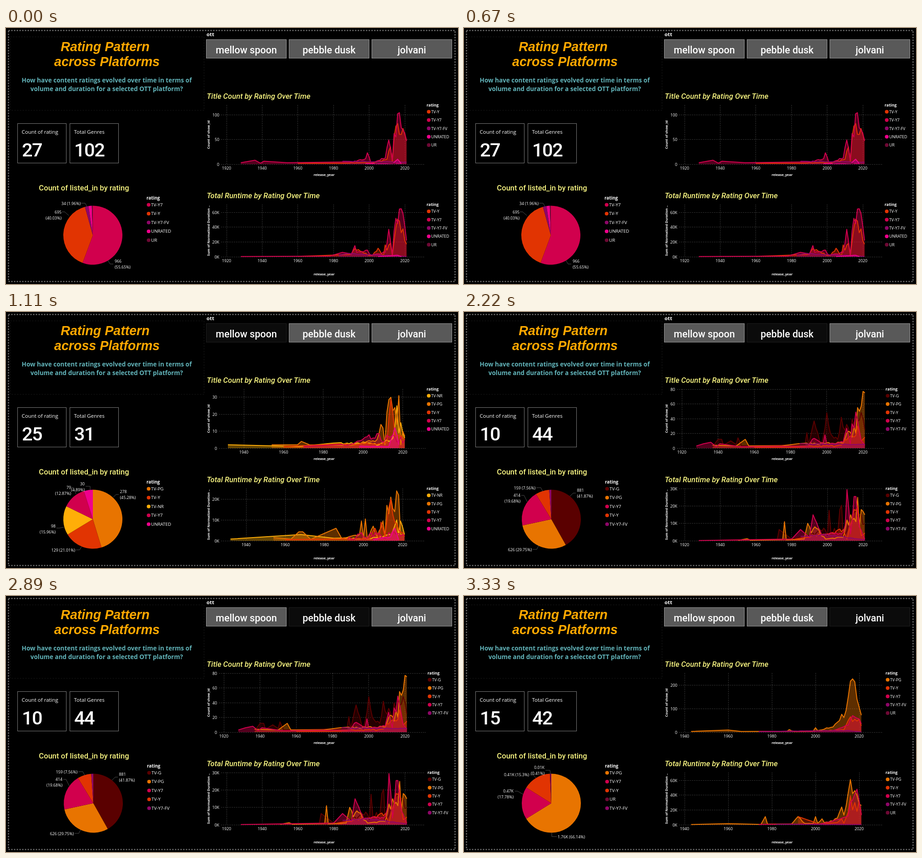
These frames come from a looping animation (994x564 px, 4.44 s). An HTML page:

```html
<!DOCTYPE html>
<html lang="en">
<head>
<meta charset="utf-8">
<title>Rating dashboard</title>
<style>
html, body { margin: 0; width: 100%; height: 100%; overflow: hidden; background: #000; }
svg { display: block; width: 994px; height: 564px; }
text { fill: #fff; font-family: "Open Sans", "Noto Sans", sans-serif; font-size: 8.8px; font-weight: 500; }
.head { font: italic bold 28.6px "Liberation Sans", Arial, sans-serif; fill: #ffa800; }
.ask { font-size: 13.5px; font-weight: 700; fill: #62b4ba; }
.ott { font-size: 11.3px; font-weight: 700; }
.btn { font: 500 21.5px Roboto, sans-serif; }
.name { font: 500 16.6px Roboto, sans-serif; fill: #f8f582; }
.tilt { font-style: italic; }
.card { font-size: 11.5px; }
.big { font: 500 41.5px Roboto, sans-serif; letter-spacing: -1.5px; }
.key { font-size: 9.8px; }
.bold { font-weight: 700; }
.axis { font-size: 7.4px; font-weight: 700; }
.mid { text-anchor: middle; }
.end { text-anchor: end; }
</style>
</head>
<body>
<svg id="stage" viewBox="0 0 994 564"></svg>
<script>
const STAY = 1110;
const RATINGS = {
  NR: ['TV-NR', '#ffae08'], PG: ['TV-PG', '#e87400'], Y: ['TV-Y', '#e13402'],
  Y7: ['TV-Y7', '#d1004d'], FV: ['TV-Y7-FV', '#8e0668'], UN: ['UNRATED', '#f0008c'],
  UR: ['UR', '#6e0834'], G: ['TV-G', '#5a0000']
};
const PLATFORMS = ['mellow spoon', 'pebble dusk', 'jolvani'];
const stage = document.getElementById('stage');

let seed = 7;
function random() {
  seed = (seed * 16807) % 2147483647;
  return seed / 2147483647;
}

function add(parent, tag, attrs) {
  const el = document.createElementNS('http://www.w3.org/2000/svg', tag);
  for (const k in attrs) el.setAttribute(k, attrs[k]);
  return parent.appendChild(el);
}
function text(parent, x, y, str, cls = '', more = {}) {
  add(parent, 'text', { x, y, class: cls, ...more }).textContent = str;
}
function box(parent, x, y, width, height, fill, stroke, more = {}) {
  add(parent, 'rect', { x, y, width, height, fill, stroke, ...more });
}
function legend(g, x, y, step, keys, cls) {
  text(g, x, y + 3.5, 'rating', cls + ' bold');
  keys.forEach((k, i) => {
    const [label, fill] = RATINGS[k];
    const cy = y + 15.5 + i * step;
    add(g, 'circle', { cx: x + 4.7, cy, r: 4.1, fill });
    text(g, x + 10, cy + 3.4, label, cls);
  });
}

// Joins key points (year, value); recent years between them wobble around the straight line.
function trace(keys, rough) {
  const pts = [];
  for (let i = 0; i < keys.length; i += 2) {
    const [year, value, nextYear, nextValue] = keys.slice(i, i + 4);
    pts.push([year, value]);
    for (let y = Math.max(year, 88) + 1; y < nextYear; y++) {
      const v = value + (nextValue - value) * (y - year) / (nextYear - year);
      pts.push([y, v * (1 + rough * (2 * random() - 1))]);
    }
  }
  return pts;
}

// Draws axes and legend; returns a function that adds one series. Years count from 1900.
function chart(g, o) {
  const { base, top, x0, year0, step, unit, gap, count, left, suffix, keys, legendX } = o;
  const px = year => x0 + (year - year0) * step;
  const py = v => base - v * unit;
  const crisp = n => Math.floor(n) + 0.5;
  const dots = { stroke: '#808080', 'stroke-dasharray': '1 3' };
  for (let yr = year0; yr <= 120; yr += 20) {
    const x = crisp(px(yr));
    add(g, 'line', { x1: x, x2: x, y1: top, y2: base, ...dots });
    text(g, px(yr), base + 12, 1900 + yr, 'mid');
  }
  for (let i = 0; i <= count; i++) {
    const y = crisp(py(i * gap));
    add(g, 'line', { x1: left + 5, x2: 922, y1: y, y2: y, ...dots });
    text(g, left, y + 3, i * gap + suffix, 'end');
  }
  legend(g, legendX, top - 1, 18.35, keys, '');
  const fills = add(g, 'g', { 'fill-opacity': 0.4 });
  const lines = add(g, 'g', { fill: 'none', 'stroke-width': 2, 'stroke-linejoin': 'round' });
  return (key, points, rough = 0.2) => {
    const color = RATINGS[key][1];
    const pts = trace(points, rough);
    const d = 'M' + pts.map(([yr, v]) => px(yr).toFixed(1) + ' ' + py(v).toFixed(1)).join('L');
    add(fills, 'path', { d: `${d}V${base}H${px(pts[0][0])}Z`, fill: color });
    add(lines, 'path', { d, stroke: color });
  };
}
const countChart = (g, o) => chart(g, { base: 300, top: 170, left: 469, suffix: '', ...o });
const timeChart = (g, o) => chart(g, { base: 504, top: 389.5, left: 469, suffix: 'K', ...o });

function pie(g, cx, parts) {
  const cy = 456.5, r = 65;
  let sum = 0;
  const point = p => {
    const a = p / 100 * 2 * Math.PI;
    return `${cx + r * Math.sin(a)} ${cy - r * Math.cos(a)}`;
  };
  for (const [key, share] of parts) {
    const from = point(sum);
    sum += share;
    add(g, 'path', {
      d: `M${cx} ${cy}L${from}A${r} ${r} 0 ${share > 50 ? 1 : 0} 1 ${point(sum)}Z`,
      fill: RATINGS[key][1]
    });
  }
  legend(g, cx + 118, 374, 19.5, parts.map(p => p[0]), 'key');
}
function note(g, x, y, lines, cls, leader) {
  lines.forEach((s, i) => text(g, x, y + i * 12.6, s, cls));
  add(g, 'path', { d: leader, fill: 'none', stroke: '#4c4c4c' });
}
function controls(g, picked, ratings, genres) {
  PLATFORMS.forEach((name, i) => {
    const x = 440.5 + i * 182, on = i === picked;
    box(g, x, 25.5, 176, 41, on ? '#0b0b0b' : '#595959', on ? '#1e1e1e' : '#999');
    text(g, x + 88, 56, name, 'btn mid');
  });
  text(g, 35, 282.5, ratings, 'big');
  text(g, 150, 282.5, genres, 'big');
}

function backdrop() {
  box(stage, 5.5, 5.5, 982, 553, 'none', '#707070', { 'stroke-width': 2.5, 'stroke-dasharray': '3 3' });
  box(stage, 9.5, 19.5, 426, 162, 'none', '#0e0e0e', { 'stroke-width': 2, 'stroke-dasharray': '3 3' });
  text(stage, 218, 51, 'Rating Pattern', 'head mid');
  text(stage, 222, 84, 'across Platforms', 'head mid');
  text(stage, 221.5, 120, 'How have content ratings evolved over time in terms of', 'ask mid');
  text(stage, 221.5, 138.5, 'volume and duration for a selected OTT platform?', 'ask mid');
  text(stage, 441, 18, 'ott', 'ott');
  ['Count of rating', 'Total Genres'].forEach((label, i) => {
    box(stage, 25.5 + i * 115, 210.5, 107, 87, '#000', '#7d7d7d');
    text(stage, 34.5 + i * 115, 233, label, 'card');
  });
  text(stage, 171.5, 358, 'Count of listed_in by rating', 'name mid');
  const labels = (y, title, axisY, axis) => {
    text(stage, 441.5, y, title, 'name tilt');
    text(stage, 0, 0, axis, 'axis mid', { transform: `translate(447.5 ${axisY}) rotate(-90)` });
    text(stage, 699.5, y + 169.5, 'release_year', 'axis mid');
  };
  labels(156, 'Title Count by Rating Over Time', 235, 'Count of show_id');
  labels(375, 'Total Runtime by Rating Over Time', 446.5, 'Sum of Normalized Duration ..');
}

function allPlatforms(g) {
  controls(g, -1, 27, 102);
  pie(g, 191, [['Y7', 55.65], ['Y', 40.03], ['FV', 1.96], ['UN', 1.8], ['UR', 0.56]]);
  note(g, 164, 390, ['34 (1.96%)'], 'end', 'M165 386h9l4 7');
  note(g, 122, 409, ['695', '(40.03%)'], 'end', 'M123 405h6l9 8');
  note(g, 239, 517, ['966', '(55.65%)'], '', 'M224 512l5 8h7');
  const axis = { x0: 485, year0: 20, step: 3.92, legendX: 925, keys: ['Y', 'Y7', 'FV', 'UN', 'UR'] };

  let area = countChart(g, { ...axis, unit: 1.09, gap: 50, count: 2 });
  area('Y', [60, 2, 103, 3, 110, 10, 112, 35, 113, 6, 114, 55, 116, 82, 118, 60, 119, 72, 121, 48]);
  area('Y7', [28, 3, 36, 8, 39, 2, 41, 6, 54, 3, 91, 4, 98, 11, 99, 23, 101, 3, 109, 12, 111, 49,
    113, 8, 114, 62, 115, 55, 116, 102, 117, 104, 121, 47]);
  area('FV', [85, 6, 121, 4]);
  area('UN', [98, 1, 113, 1, 116, 10, 118, 1]);
  area('UR', [103, 2, 115, 2]);

  area = timeChart(g, { ...axis, unit: 1.633, gap: 20, count: 3 });
  area('Y', [60, 0.5, 90, 4, 92, 11, 100, 2, 102, 2, 105, 11.5, 108, 1.5, 109, 16, 110, 9, 112, 18,
    113, 1.5, 115, 39, 117, 48, 121, 17]);
  area('Y7', [28, 0.3, 78, 1, 85, 6, 90, 3, 92, 15, 93, 6, 99, 9, 101, 2, 109, 6, 111, 37, 113, 3,
    114, 35, 117, 64.5, 118, 64.8, 121, 22]);
  area('FV', [83, 2.5, 90, 4, 121, 0.5]);
  area('UN', [105, 0.3, 116, 2, 118, 0.3]);
}

function firstPlatform(g) {
  controls(g, 0, 25, 31);
  pie(g, 191, [['PG', 45.28], ['Y', 21.01], ['NR', 15.96], ['Y7', 12.87], ['UN', 4.88]]);
  note(g, 250.5, 399, ['278', '(45.28%)'], '', 'M236 408l6 -6h6');
  note(g, 173, 382, ['30', '(4.89%)'], 'end', 'M175 384h10v8');
  note(g, 143, 390, ['79', '(12.87%)'], 'end', 'M144 387h5l5 14');
  note(g, 109, 475, ['98', '(15.96%)'], 'end', 'M111 476h7l9 -2');
  note(g, 152, 528, ['129 (21.01%)'], 'end', 'M154 524h8l4 -7');
  const axis = { year0: 40, legendX: 925, keys: ['NR', 'PG', 'Y', 'Y7', 'UN'] };

  let area = countChart(g, { ...axis, x0: 523, step: 4.37, unit: 3.735, left: 464, gap: 10, count: 3 });
  area('NR', [32, 2, 68, 1, 85, 3, 100, 3, 108, 2, 115, 6, 117, 25, 118, 9, 119, 15, 121, 6]);
  area('PG', [54, 2, 67, 2, 69, 4, 73, 2, 95, 2, 107, 5, 109, 14, 110, 12, 111, 2, 112, 21, 114, 30,
    115, 22, 116, 24, 117, 14, 118, 31, 119, 2, 120, 10, 121, 7]);
  area('Y', [60, 1, 112, 3, 114, 29, 116, 8, 121, 5]);
  area('Y7', [70, 1, 93, 2, 105, 6, 121, 5], 0.5);
  area('UN', [98, 1, 113, 1, 116, 12, 118, 2]);

  area = timeChart(g, { ...axis, x0: 528, step: 4.3, unit: 4.58, gap: 10, count: 2 });
  area('NR', [32, 0.8, 68, 3, 85, 1.2, 103, 1, 114, 3, 117, 10, 118, 3, 119, 9.5, 121, 3]);
  area('PG', [54, 1.5, 63, 0.8, 67, 4.3, 69, 4.3, 73, 0.7, 86, 6, 89, 1, 98, 3, 99, 9.5, 100, 1,
    101, 10.5, 102, 1, 105, 7, 107, 2, 110, 9.5, 111, 2, 112, 17, 113, 13, 114, 21, 116, 14,
    117, 24, 118, 22, 119, 3, 121, 3]);
  area('Y', [60, 0.6, 103, 1, 106, 6, 108, 0.5, 109, 9, 111, 2, 114, 20, 116, 9, 121, 2]);
  area('Y7', [92, 0.8, 106, 4, 121, 2.5], 0.7);
  area('UN', [105, 0.5, 114, 2, 116, 6, 118, 0.5]);
}

function secondPlatform(g) {
  controls(g, 1, 10, 44);
  pie(g, 192, [['G', 41.87], ['PG', 29.75], ['Y7', 19.68], ['Y', 7.56], ['FV', 1.14]]);
  note(g, 248.5, 396, ['881', '(41.87%)'], '', 'M233 406l7 -7h6');
  note(g, 157, 391, ['159 (7.56%)'], 'end', 'M159 387h10l4 8');
  note(g, 124, 407, ['414', '(19.68%)'], 'end', 'M126 404h6l7 14');
  note(g, 149, 527, ['626 (29.75%)'], 'end', 'M151 523h9l4 -8');
  const axis = { year0: 20, legendX: 927, keys: ['G', 'PG', 'Y', 'Y7', 'FV'] };

  let area = countChart(g, { ...axis, x0: 479, step: 3.985, unit: 1.625, left: 464, gap: 20, count: 4 });
  area('G', [37, 2, 40, 12, 42, 12, 43, 4, 47, 10, 50, 5, 51, 14, 53, 3, 88, 5, 89, 21, 90, 5, 93, 37,
    97, 5, 100, 48, 102, 20, 106, 12, 108, 42, 113, 18, 114, 40, 120, 40, 121, 25], 0.25);
  area('PG', [37, 4, 50, 3, 55, 12, 57, 3, 75, 3, 84, 6, 109, 7, 112, 23, 114, 15, 115, 30, 116, 20,
    117, 55, 118, 50, 119, 57, 120, 77, 121, 75]);
  area('Y', [60, 1, 88, 2, 105, 3, 115, 15, 117, 30, 119, 10, 121, 15], 0.4);
  area('Y7', [28, 3, 32, 6, 36, 8, 39, 2, 41, 6, 52, 2, 90, 3, 92, 12, 94, 12, 98, 6, 99, 18, 100, 5,
    109, 8, 111, 27, 113, 6, 114, 33, 115, 27, 116, 49, 119, 10, 121, 4]);
  area('FV', [85, 6, 121, 5], 0.1);

  area = timeChart(g, { ...axis, x0: 485, step: 3.925, unit: 3.82, gap: 10, count: 3 });
  area('G', [37, 0.2, 72, 1, 73, 6.5, 80, 1, 89, 3, 99, 6, 100, 3, 101, 17.5, 102, 5, 106, 6, 107, 18,
    108, 20.5, 109, 2, 116, 18, 121, 10], 0.3);
  area('PG', [50, 0.3, 55, 1.2, 57, 0.3, 75, 0.8, 76, 11, 77, 0.5, 87, 1, 89, 10, 91, 4.5, 93, 8,
    99, 1, 109, 2, 111, 12, 112, 9, 113, 15, 116, 11, 117, 25, 118, 8, 119, 18, 121, 15]);
  area('Y', [82, 1, 100, 4, 109, 6.5, 111, 1, 115, 18, 117, 20, 119, 3, 121, 4.5]);
  area('Y7', [28, 0.1, 80, 1, 85, 6.5, 90, 2, 92, 15, 97, 3, 109, 5, 110, 9, 111, 29.5, 113, 4,
    115, 25.5, 116, 25.5, 118, 8, 121, 1]);
  area('FV', [85, 2.5, 100, 3.5, 121, 0.5], 0.1);
}

function thirdPlatform(g) {
  controls(g, 2, 15, 42);
  pie(g, 192, [['PG', 66.14], ['Y7', 17.78], ['Y', 15.3], ['UR', 0.41], ['FV', 0.37]]);
  note(g, 177, 381, ['0.01K', '(0.41%)'], 'end', 'M179 384h10l1 8');
  note(g, 143, 397, ['0.41K (15.3%)'], 'end', 'M145 394h7l6 7');
  note(g, 109, 433, ['0.47K', '(17.78%)'], 'end', 'M112 430h6l12 7');
  note(g, 206, 534, ['1.76K (66.14%)'], '', 'M193 522v8h11');
  const axis = { x0: 485, year0: 40, step: 4.8, legendX: 927, keys: ['PG', 'Y', 'Y7', 'FV', 'UR'] };

  let area = countChart(g, { ...axis, unit: 0.52, gap: 100, count: 2 });
  area('PG', [43, 3, 60, 9, 66, 3, 87, 4, 88, 11, 90, 3, 99, 5, 100, 19, 101, 6, 108, 22, 110, 42,
    112, 76, 113, 62, 115, 150, 116, 216, 117, 226, 118, 213, 120, 107, 121, 72]);
  area('Y', [90, 2, 110, 8, 113, 10, 116, 65, 117, 45, 120, 55, 121, 27]);
  area('Y7', [74, 3, 108, 6, 115, 30, 117, 70, 120, 56, 121, 35], 0.1);
  area('FV', [74, 2, 114, 7, 121, 1]);
  area('UR', [100, 1, 118, 1]);

  area = timeChart(g, { ...axis, unit: 1.633, gap: 20, count: 3 });
  area('PG', [43, 0.3, 60, 1.5, 75, 0.5, 77, 11, 78, 1, 89, 1, 92, 11, 95, 2, 99, 2, 100, 11, 101, 2,
    103, 8, 104, 3, 108, 5, 110, 9, 112, 24, 113, 13, 116, 61, 117, 42, 118, 46, 120, 28, 121, 26]);
  area('Y', [92, 11, 99, 4, 101, 1, 110, 3, 112, 8, 113, 2, 115, 17, 116, 39, 117, 20, 118, 30,
    119, 18, 120, 32, 121, 14], 0);
  area('Y7', [74, 0.5, 102, 1, 107, 4, 115, 12, 116, 30, 119, 48, 121, 13], 0.1);
  area('FV', [82, 0.7, 121, 0.3]);
}

backdrop();
const views = [allPlatforms, firstPlatform, secondPlatform, thirdPlatform].map(build => {
  const g = add(stage, 'g', { visibility: 'hidden' });
  build(g);
  return g;
});

let start = null;
function draw(now) {
  if (start === null) start = now;
  const current = Math.floor((now - start) / STAY) % views.length;
  views.forEach((g, i) => g.setAttribute('visibility', i === current ? 'visible' : 'hidden'));
  requestAnimationFrame(draw);
}
requestAnimationFrame(draw);
</script>
</body>
</html>
```
